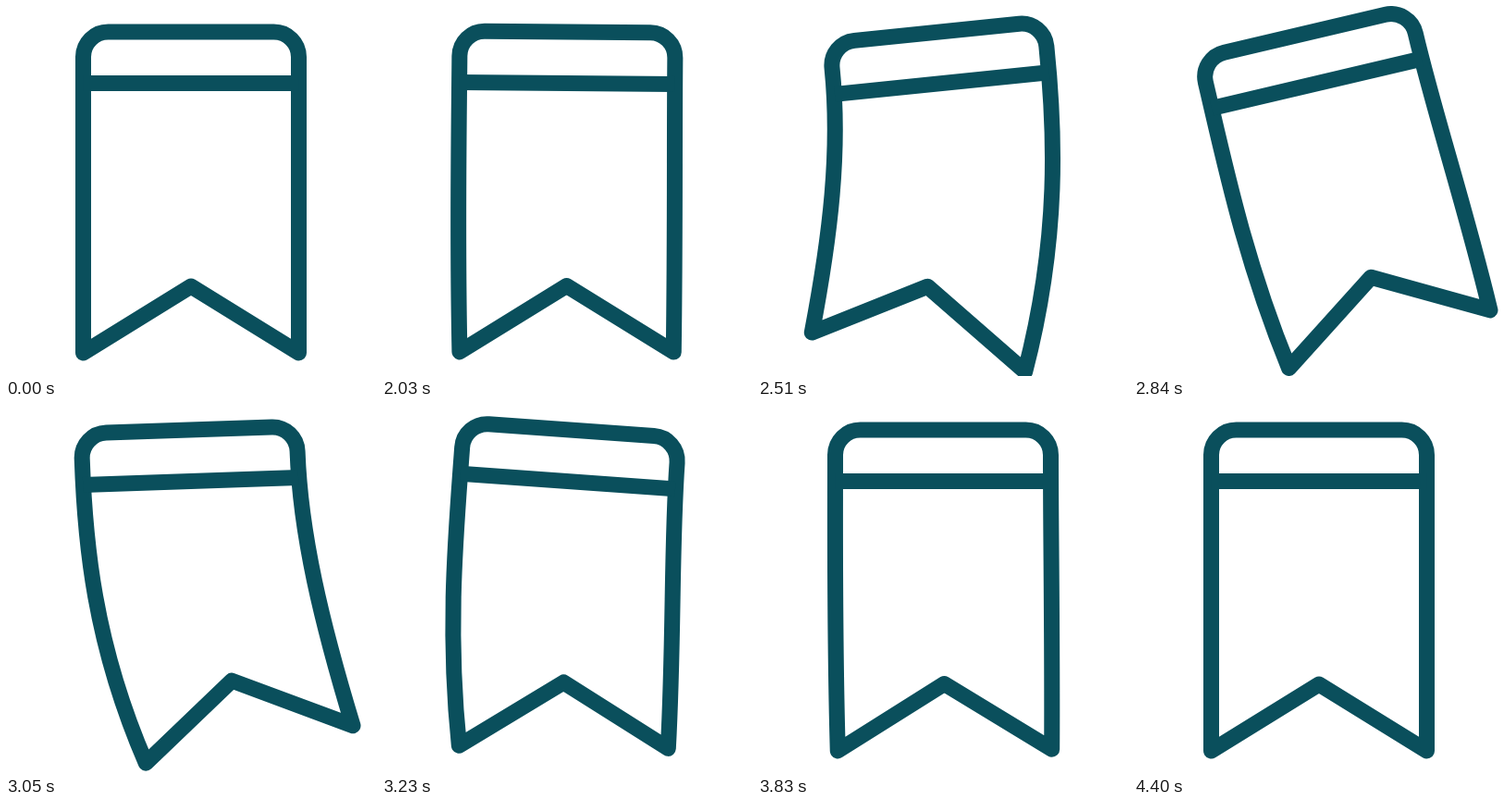
An HTML page that plays this animation: 400x400 px, repeating every 4.43 s.

```html
<!DOCTYPE html>
<html lang="en">
<head>
<meta charset="utf-8">
<title>Bookmark</title>
<style>
  html, body { margin: 0; width: 100%; height: 100%; overflow: hidden; background: #fff; }
  svg { display: block; width: 100vw; height: 100vh; }
  path { fill: none; stroke: #0a4f5c; stroke-width: 17; stroke-linejoin: round; }
</style>
</head>
<body>
<svg viewBox="0 0 400 400">
  <g id="ribbon">
    <path id="outline"/>
    <path d="M83.5 83.5H316.5"/>
  </g>
</svg>
<script>
  const LOOP = 4430, REST = 2000, STEP = 30;
  const LEFT = 83.5, RIGHT = 316.5;
  const ribbon = document.getElementById('ribbon');
  const outline = document.getElementById('outline');

  // Turning points as [step, value]: head in degrees, tail in pixels sideways.
  const head = [[0, 0], [6.5, 8], [25, -15], [41, 4.1], [55, 0]];
  const tail = [[0, 0], [5, 20], [17.5, -55], [35.4, 54], [47, -26], [69, 14], [80, 0]];

  const ease = p => p * p * (3 - 2 * p);

  function sample(keys, s) {
    const i = keys.findIndex(k => k[0] > s);
    if (i < 0) return keys[keys.length - 1][1];
    const [s0, a] = keys[i - 1], [s1, b] = keys[i];
    return a + (b - a) * ease((s - s0) / (s1 - s0));
  }

  // The tail follows the sideways sway: it tilts, lifts, narrows and bellies out.
  function ribbonPath(sway) {
    const flex = Math.tanh(Math.abs(sway) / 10);
    const tilt = 0.45 * sway - 0.0027 * sway * sway;
    const lift = 5 * flex;
    const side = (x, dir) => ({
      bendX: x + 0.24 * sway + dir * 7 * flex,
      bendY: 250 - 0.4 * (dir * tilt + lift),
      tipX: x + sway - dir * 4 * flex,
      tipY: 375 - dir * tilt - lift
    });
    const l = side(LEFT, -1), r = side(RIGHT, 1);
    return `M${LEFT} 55A27 27 0 0 1 110.5 28H289.5A27 27 0 0 1 ${RIGHT} 55
      C${RIGHT} 145 ${r.bendX} ${r.bendY} ${r.tipX} ${r.tipY}
      L${200 + 0.69 * sway} ${303 - lift / 2}L${l.tipX} ${l.tipY}
      C${l.bendX} ${l.bendY} ${LEFT} 145 ${LEFT} 55Z`;
  }

  function draw(ms) {
    const s = Math.max(0, Math.floor((ms % LOOP - REST) / STEP));
    ribbon.setAttribute('transform', `rotate(${sample(head, s)} 200 95)`);
    outline.setAttribute('d', ribbonPath(sample(tail, s)));
  }

  const t0 = performance.now();
  function tick() {
    draw(performance.now() - t0);
    requestAnimationFrame(tick);
  }
  draw(0);
  requestAnimationFrame(tick);
</script>
</body>
</html>
```
